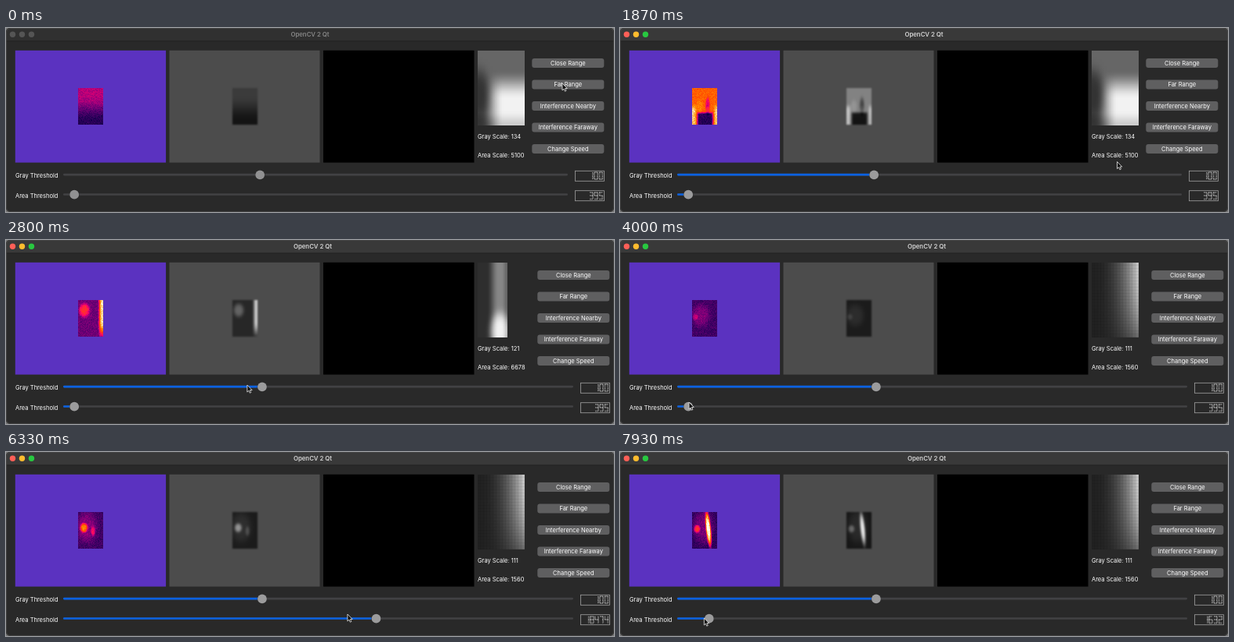
These frames come from a looping animation (776x236 px, 8 s). An HTML page with a canvas:

```html
<!DOCTYPE html>
<html>
<head>
<meta charset="utf-8">
<style>
  html, body { margin: 0; width: 100%; height: 100%; overflow: hidden; background: #777; }
  canvas { display: block; }
</style>
</head>
<body>
<canvas id="stage" width="776" height="236"></canvas>
<script>
const ctx = document.getElementById('stage').getContext('2d');
const LOOP = 8000, STEP = LOOP / 120;
const ACTIVE_AT = 400, WIDE_AT = 1930, DRAG_AT = 4150, TURN_AT = 5121, DRAG_LAG = 140;
const BUTTONS = ['Close Range', 'Far Range', 'Interference Nearby', 'Interference Faraway', 'Change Speed'];
// Lit segments per digit: top, upper left, upper right, middle, lower left, lower right, bottom.
const DIGITS = ['1110111', '0010010', '1011101', '1011011', '0111010', '1101011', '1101111', '1010010', '1111111', '1111011'];

const clamp = v => Math.min(1, Math.max(0, v));
const mix = (a, b, k) => a + (b - a) * k;
const ramp = (v, from, to) => clamp((v - from) / (to - from));
const ease = (v, from, to) => { const k = ramp(v, from, to); return k * k * (3 - 2 * k); };
const blob = (x, y, cx, cy, rx, ry) => Math.exp(-((((x - cx) / rx) ** 2 + ((y - cy) / ry) ** 2) ** 2));

// Heat over the unit square; each scene fades in from its start time.
const SCENES = [
  { from: -LOOP, heat: (x, y) => .05 + .16 * (1 - ease(y, .2, .9)) },
  { from: 350, heat: (x, y) => .17 - .1 * ease(y, .6, .9) + .3 * blob(x, y, .3, .5, .12, .18) + .25 * blob(x, y, .62, .58, .08, .1) },
  { from: 1600, heat: (x, y) => .62 - .35 * blob(x, y, .62, .48, .09, .22) + .38 * ease(y, .4, .6) * ease(Math.abs(x - .52), .3, .45)
    - .58 * ease(y, .62, .72) * (1 - ease(Math.abs(x - .52), .24, .38)) },
  { from: 2350, heat: (x, y) => .13 + .7 * ease(x, .78, .95) * (1 - ease(y, .6, 1.1)) + .25 * blob(x, y, .25, .28, .2, .18) },
  { from: 2900, heat: (x, y) => .08 + .07 * blob(x, y, .35, .42, .35, .3) + .1 * blob(x, y, .14, .46, .1, .08) },
  { from: 5200, heat: (x, y) => .08 + .08 * blob(x, y, .35, .42, .4, .4) + .42 * blob(x, y, .23, .43, .14, .12) + .15 * blob(x, y, .6, .52, .08, .13) },
  { from: 7000, heat: (x, y) => .06 + .08 * blob(x, y, .45, .4, .4, .45) + .8 * blob(x - .15 * y, y, .58, .46, .09, .43)
    + .27 * blob(x, y, .2, .46, .12, .1) }
];

// Close-ups of the latest detection.
const CAPTURES = [
  { from: -LOOP, gray: 134, area: 5100, width: 60,
    heat: (x, y) => .4 + .55 * ease(y, .25, .65) * ease(x, .1, .55) - .2 * blob(x, y, 0, .6, .28, .35) - .15 * ease(y, .8, 1) },
  { from: WIDE_AT, gray: 116, area: 38640, width: 60,
    heat: (x, y) => .6 - .32 * blob(x, y, .6, .42, .25, .28) + .4 * blob(x, y, .12, .68, .22, .3) - .42 * ease(y, .5, .85) * ease(x, .2, .45) },
  { from: 2400, gray: 121, area: 6678, width: 38,
    heat: (x, y) => .18 + .35 * ease(x, .3, .7) * (1 - .4 * ease(x, .8, 1)) + .42 * blob(x, y, .75, .92, .35, .25) },
  { from: 3000, gray: 111, area: 1560, width: 60, cells: true,
    heat: (x, y) => .13 + .6 * x ** 2.3 * (1.15 - .65 * y * y) }
];

function noise(x, y, seed) {
  const n = Math.sin(x * 12.9898 + y * 78.233 + seed * 3.71) * 43758.5453;
  return n - Math.floor(n) - .5;
}
const grey = v => [v, v, v];
const iron = v => [ramp(v, .01, .29), ramp(v, .27, .9), Math.max(.48 * Math.sin(Math.PI * ramp(v, -.08, .45)), ramp(v, .62, .95))];

function raster(w, h, colour) {
  const canvas = document.createElement('canvas');
  canvas.width = w;
  canvas.height = h;
  const c = canvas.getContext('2d'), image = c.createImageData(w, h);
  for (let y = 0, i = 0; y < h; y++) for (let x = 0; x < w; x++, i += 4)
    image.data.set([...colour((x + .5) / w, (y + .5) / h, x, y).map(v => clamp(v) * 255), 255], i);
  c.putImageData(image, 0, 0);
  return canvas;
}
for (const c of CAPTURES) c.image = raster(20, 32, (x, y) => grey(c.heat(x, y)));

function rect(x, y, w, h, fill) {
  ctx.fillStyle = fill;
  ctx.fillRect(x, y, w, h);
}
function pill(x, y, w, h, r, fill) {
  ctx.fillStyle = fill;
  ctx.beginPath();
  ctx.roundRect(x, y, w, h, r);
  ctx.fill();
}
function disc(x, y, r, fill) {
  ctx.fillStyle = fill;
  ctx.beginPath();
  ctx.arc(x, y, r, 0, 7);
  ctx.fill();
}
function outline(x, y, w, h, colour, width) {
  ctx.strokeStyle = colour;
  ctx.lineWidth = width;
  ctx.strokeRect(x, y, w, h);
}
function label(text, x, y, { fill = '#fff', align = 'left', font = '7.5px' } = {}) {
  ctx.font = font + ' Inter, sans-serif';
  ctx.textAlign = align;
  ctx.fillStyle = fill;
  ctx.fillText(text, x, y);
}

function drawWindow(active, end) {
  rect(0, 0, 776, 236, '#777');
  pill(0, 0, 776, 236, 5, '#292929');
  pill(0, 0, 776, 17, [5, 5, 0, 0], active ? '#393939' : '#303030');
  rect(0, 16.5, 776, .7, '#1a1a1a');
  ctx.beginPath();
  ctx.roundRect(.5, .5, 775, 235, 5);
  ctx.strokeStyle = '#484848';
  ctx.lineWidth = .8;
  ctx.stroke();
  ['#fe5f57', '#febc2e', '#28c840'].forEach((c, i) => disc(8.5 + 12 * i, 8.3, 3.7, active ? c : '#555'));
  label('OpenCV 2 Qt', end / 2 + 29.5, 11, { fill: active ? '#d2d2d2' : '#858585', align: 'center', font: '600 7.8px' });
}

function drawViews(t, frame) {
  const i = SCENES.findLastIndex(s => s.from <= t), scene = SCENES[i], before = SCENES[Math.max(0, i - 1)];
  const k = ease(t, scene.from, scene.from + 400);
  const level = (x, y) => mix(before.heat(x, y), scene.heat(x, y), k);
  const thermal = raster(32, 47, (x, y, px, py) => {
    const v = level(x, y);
    return iron(v + noise(px, py, frame) * (.04 + .16 * v));
  });
  const soft = raster(32, 47, (x, y) => grey(level(x, y) * .95 + .03));
  rect(11.8, 28.8, 192.3, 143.8, '#5b32c0');
  rect(208.5, 28.8, 192, 143.8, '#4c4c4c');
  rect(405, 28.8, 192.5, 143.8, '#000');
  ctx.drawImage(thermal, 92, 77);
  ctx.filter = 'blur(1px)';
  ctx.drawImage(soft, 289, 77);
  ctx.filter = 'none';
}

function drawCapture(t) {
  const c = CAPTURES.findLast(c => c.from <= t);
  ctx.drawImage(c.image, 602, 29, c.width, 96);
  if (c.cells) {
    ctx.fillStyle = 'rgba(0,0,0,.06)';
    for (let x = 605; x < 662; x += 4) ctx.fillRect(x, 29, 1, 96);
    for (let y = 32; y < 125; y += 4) ctx.fillRect(602, y, 60, 1);
  }
  label('Gray Scale: ' + c.gray, 602, 142);
  label('Area Scale: ' + c.area, 602, 166);
  if (t - c.from < 400) {
    const w = Math.sqrt(c.area / 1.5) * .302, h = w * 1.5;
    ['#22d83c', '#f4f4f4', '#fff'].forEach((colour, i) => outline(86 + 197 * i, 78, w, h, colour, 1.4));
    ctx.setLineDash([1, 2]);
    outline(86, 78, w, h, '#2a7a35', 1);
    ctx.setLineDash([]);
  }
}

function drawNumber(value, right, y) {
  const text = String(value);
  [...text].forEach((digit, i) => {
    const x = right - 5 - 6.2 * (text.length - 1 - i);
    [...DIGITS[digit]].forEach((lit, s) => {
      if (lit === '0') return;
      if (s % 3 === 0) outline(x + .7, y + s / 3 * 4.4, 3.4, 1, '#b4b4b4', .4);
      else outline(x + (s % 3 - 1) * 3.9, y + (s < 3 ? .8 : 5.2), 1, 3.8, '#b4b4b4', .4);
    });
  });
}

function drawSlider(name, y, handle, end, value, active) {
  label(name, 12, y + 4.3);
  pill(73, y - 1.3, end - 73, 2.6, 1.3, '#424244');
  if (active) pill(73, y - 1.3, handle - 73, 2.6, 1.3, '#0a61e2');
  disc(handle, y + .2, 6.2, '#252525');
  disc(handle, y + .2, 5.9, active ? '#9b9b9c' : '#919192');
  outline(end + 9.5, y - 4.8, 37, 13, '#a0a0a0', .8);
  drawNumber(value, end + 45, y - 3.3);
}

const ARROW = new Path2D('M0 0V9L2 7.1 3.4 10.2 4.9 9.5 3.6 6.5H6.3Z');
function drawCursor([x, y]) {
  ctx.save();
  ctx.translate(x, y);
  ctx.fillStyle = '#111';
  ctx.fill(ARROW);
  ctx.strokeStyle = '#eee';
  ctx.lineWidth = .8;
  ctx.stroke(ARROW);
  ctx.restore();
}

// From the button down to the lower handle, then drag right and back.
function pointer(t) {
  const y = 71 + 115 * ease(t, 1400, 2000) + 22 * ease(t, 2900, 3400) + 5 * ease(t, 6330, 7900);
  if (t < DRAG_AT) return [mix(710, 88, ramp(t, 1651, 3428)), y];
  if (t < TURN_AT) return [mix(88, 640, ease(t, DRAG_AT, TURN_AT)), y];
  return [mix(640, 106.5, ease(t, TURN_AT, LOOP)), y];
}

function draw(time) {
  const frame = Math.floor((time % LOOP + 5) / STEP), t = frame * STEP;
  const active = t >= ACTIVE_AT, end = t >= WIDE_AT ? 724 : 717, span = end - 85;
  drawWindow(active, end);
  drawViews(t, frame);
  drawCapture(t);
  BUTTONS.forEach((name, i) => {
    const x = end - 45.7, y = 39 + 27.5 * i;
    pill(x, y, 92, 12, 3, '#5f5f60');
    label(name, x + 46, y + 8.6, { align: 'center' });
  });

  // The handle trails the pointer slightly while dragged.
  const dragged = t >= DRAG_AT + DRAG_LAG;
  const areaX = dragged ? pointer(t - DRAG_LAG)[0] - .6 : 87.2;
  const area = dragged ? Math.round((areaX - 79) / span * 30000) : 395;
  drawSlider('Gray Threshold', 188.1, 79 + span * .388, end, 100, active);
  drawSlider('Area Threshold', 213.5, areaX, end, area, active);
  drawCursor(pointer(t));
}

const start = performance.now();
function tick() {
  draw(performance.now() - start);
  requestAnimationFrame(tick);
}
tick();
</script>
</body>
</html>
```
